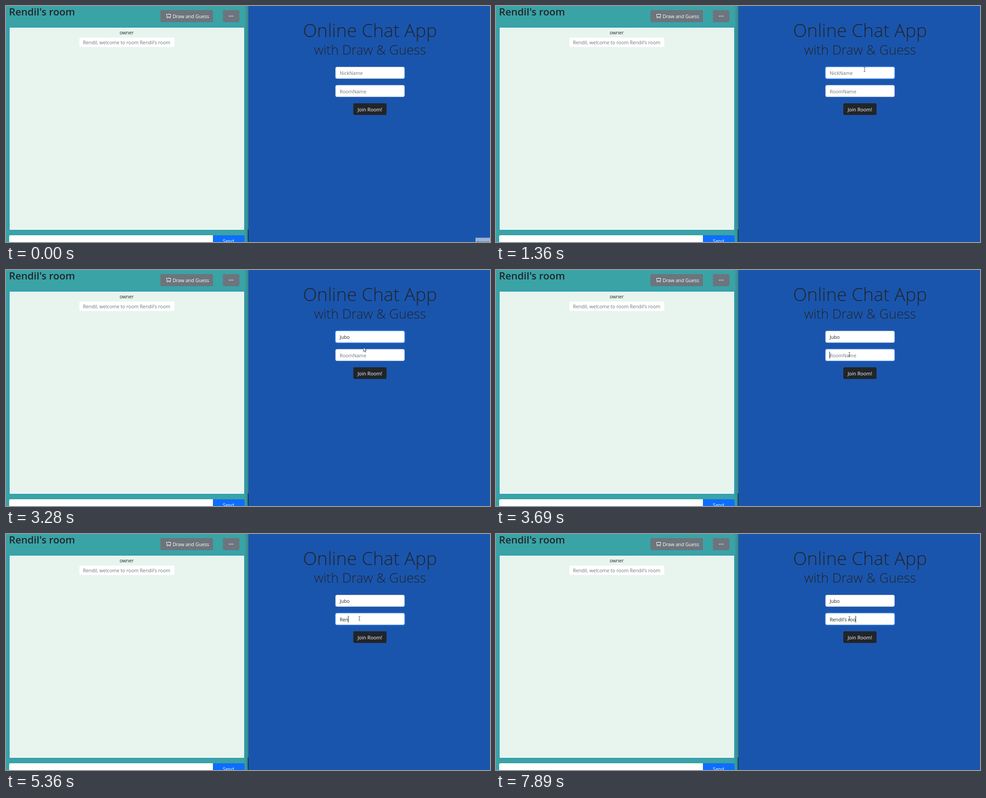
An HTML page that plays this animation: 1069 by 524 pixels, repeating every 8000 ms.

```html
<!DOCTYPE html>
<html lang="en">
<head>
<meta charset="utf-8">
<title>Online chat app</title>
<style>
  html, body { margin: 0; width: 100%; height: 100%; overflow: hidden; background: #1a55ad; }
  svg { display: block; width: 1069px; height: 524px; }
  text { font: 10.6px "Open Sans", "Noto Sans", sans-serif; fill: #212529; white-space: pre; }
  .mid { text-anchor: middle; }
  .light { font-weight: 300; }
  .muted { fill: #6c757d; }
  .white { fill: #fff; }
</style>
</head>
<body>
<svg viewBox="0 0 1069 524">
  <defs>
    <linearGradient id="shade">
      <stop offset="0" stop-color="#3aa3a6"/>
      <stop offset="1" stop-color="#358588"/>
    </linearGradient>
  </defs>

  <!-- chat room -->
  <rect width="536" height="524" fill="#3aa3a6"/>
  <rect x="526" width="10" height="524" fill="url(#shade)"/>
  <text x="6.500" y="21" style="font-size:22.200px;font-weight:600">Rendil's room</text>
  <rect x="341" y="9" width="116" height="27" rx="3" fill="#6c757d"/>
  <path d="M354 18.500h10.500M355 18.500v6h8.500v-6M359.250 17v1.500M357 24.500l-1.500 3.500M361.500 24.500l1.500 3.500M359.250 24.500v2" fill="none" stroke="#fff"/>
  <text class="white" x="368" y="27">Draw and Guess</text>
  <rect x="479" y="9" width="36.500" height="27" rx="3" fill="#6c757d"/>
  <path d="M493.500 22.500h0m3.700 0h0m3.700 0h0" stroke="#fff" stroke-width="2.200" stroke-linecap="round"/>
  <rect x="7.500" y="47.500" width="519" height="450" fill="#e8f5ee" stroke="#2496cc"/>
  <text class="mid" x="266.500" y="63">owner</text>
  <rect x="162" y="70" width="209.500" height="21" rx="3" fill="#fff"/>
  <text class="mid muted" x="266.500" y="85">Rendil, welcome to room Rendil's room</text>
  <path d="M457 509H10q-3 0-3 3v12h450z" fill="#fff"/>
  <path d="M457 509h67q3 0 3 3v12h-70z" fill="#0d6efd"/>
  <text class="mid white" x="491.500" y="526">Send</text>

  <!-- login page -->
  <rect id="page" y="0" width="540" height="524" fill="#1a55ad"/>
  <rect x="535" width="1" height="524" fill="#2a6095"/>
  <rect x="534" y="496" width="1.500" height="28" fill="#10283f"/>
  <text class="mid light" x="804" y="69" style="font-size:40.400px">Online Chat App</text>
  <text class="mid light" x="804" y="108" style="font-size:29.200px">with Draw &amp; Guess</text>
  <g id="fields"></g>
  <rect x="767" y="216" width="73.500" height="26" rx="3" fill="#212529"/>
  <text class="mid white" x="803.800" y="234" style="font-size:10.800px">Join Room!</text>
  <g id="record">
    <rect x="1037" y="514.500" width="32" height="10" fill="#9db2d6"/>
    <text x="1040" y="526.500" style="font-size:8px">Record</text>
  </g>

  <path id="arrow" d="M0 0v9l2.200-2 1.500 3.300 1.600-.7-1.500-3.200h2.900z" fill="#fff" stroke="#222" stroke-width=".8"/>
  <path id="beam" d="M-2-4.500h1.500l.5.500.5-.5h1.500M0-4v8M-2 4.500h1.500l.5-.5.5.5h1.500" fill="none" stroke="#444" stroke-width=".9"/>
</svg>
<script>
const LOOP = 8000, BLINK = 530, TEXT_X = 737;
const $ = id => document.getElementById(id);
const clamp = v => Math.max(0, Math.min(1, v));

function make(tag, attrs, parent) {
  const el = document.createElementNS("http://www.w3.org/2000/svg", tag);
  for (const k in attrs) el.setAttribute(k, attrs[k]);
  return parent.appendChild(el);
}

function field(y, hint, value, focus, blur, keys) {
  const g = $("fields");
  const frame = { x: 727.9, y: y + .4, width: 152.2, height: 25.7, rx: 3, "stroke-width": .7 };
  const ring = make("rect", { x: 725.2, y: y - 2.5, width: 157.6, height: 31.5, rx: 5, fill: "#0d6efd", "fill-opacity": .27 }, g);
  make("rect", { ...frame, fill: "#fff", stroke: "#ced4da" }, g);
  const edge = make("rect", { ...frame, fill: "none", stroke: "#86b7fe" }, g);
  const text = make("text", { x: TEXT_X, y: y + 18 }, g);
  const caret = make("rect", { y: y + 6, width: 1, height: 15, fill: "#111" }, g);

  return t => {
    const typed = keys.filter(k => k <= t).length;
    const glow = clamp((t - focus) / 130) * clamp(1 - (t - blur) / 130);
    ring.setAttribute("opacity", glow);
    edge.setAttribute("opacity", glow);
    text.textContent = typed ? value.slice(0, typed) : hint;
    text.setAttribute("class", typed ? "" : "muted");
    const last = typed ? keys[typed - 1] : focus;
    const shown = t >= focus && t < blur && (t - last) % (2 * BLINK) < BLINK;
    caret.setAttribute("opacity", shown ? 1 : 0);
    caret.setAttribute("x", TEXT_X - .5 + (typed ? text.getComputedTextLength() : 0));
  };
}

const fields = [
  field(135, "NickName", "Jubo", 825, 3600, [1950, 2140, 2410, 2610]),
  field(175.5, "RoomName", "Rendil's room", 3615, LOOP,
    [4760, 5090, 5360, 5490, 5620, 5820, 6360, 6420, 6890, 7560, 7690, 7890])
];

// pointer waypoints: time, x, y
const path = [
  [70, 1066, 522], [206, 985, 390], [342, 890, 235], [478, 830, 160], [680, 814.5, 142],
  [820, 814, 141], [3070, 814, 141], [3210, 800, 158], [3280, 789.5, 172],
  [3410, 783, 183], [3550, 780.5, 187.5]
];

// the pointer moves in steps, as a screen recording does
function pointer(t) {
  if (t < 820) t = 70 + Math.floor((t - 69) / 67.8) * 67.8;
  else if (t > 3140) t = 3140 + Math.floor((t - 3139) / 68.75) * 68.75 + 3;
  const i = path.findIndex(p => p[0] > t);
  if (i < 0) return path[path.length - 1].slice(1);
  if (!i) return path[0].slice(1);
  const [a, b] = [path[i - 1], path[i]];
  const k = (t - a[0]) / (b[0] - a[0]);
  return [a[1] + (b[1] - a[1]) * k, a[2] + (b[2] - a[2]) * k];
}

function draw(t) {
  fields.forEach(f => f(t));
  $("page").setAttribute("x", t < 820 ? 536 : 535);
  $("record").setAttribute("opacity", t < 138 ? 1 : 0);
  const [x, y] = pointer(t);
  const inField = x > 727 && x < 881 && (y > 135 && y < 162 || y > 175 && y < 202);
  for (const id of ["arrow", "beam"]) {
    const on = t >= 70 && (id === "beam") === inField;
    $(id).setAttribute("opacity", on ? 1 : 0);
    $(id).setAttribute("transform", `translate(${x} ${y})`);
  }
}

const start = performance.now();
function tick() {
  draw((performance.now() - start) % LOOP);
  requestAnimationFrame(tick);
}
tick();
</script>
</body>
</html>
```
